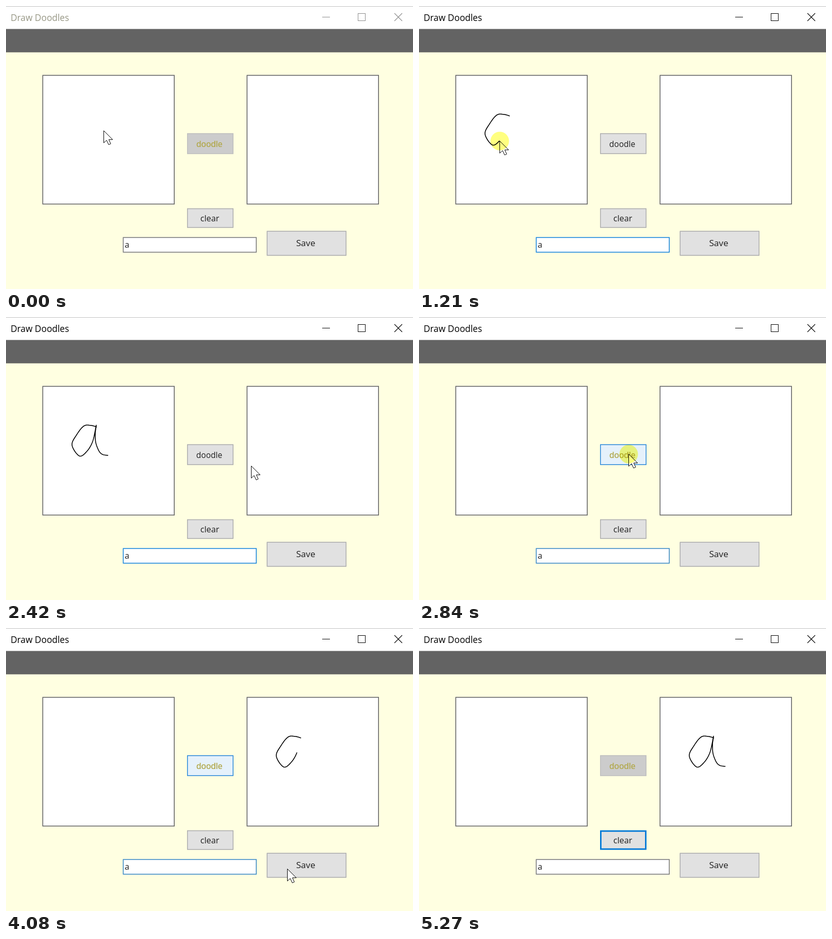
These frames come from a looping animation (789x548 px, 5.49 s). An HTML page with a canvas:

```html
<!DOCTYPE html>
<html lang="en">
<head>
<meta charset="utf-8">
<title>Draw Doodles</title>
<style>
  html, body { margin: 0; width: 100%; height: 100%; overflow: hidden; background: #ffffe1; }
  canvas { display: block; width: 789px; height: 548px; }
</style>
</head>
<body>
<canvas id="stage" width="789" height="548"></canvas>
<script>
const ctx = document.getElementById('stage').getContext('2d');
const LOOP = 5490, STEP = 203, LEAD = 18;   // the screen refreshes once per STEP
const FONT = '"Open Sans", "Noto Sans", sans-serif';
const BLUE = '#0078d7', GREY = '#adadad', FACE = '#e1e1e1', TEXT = '#202020';

// Refresh counts at which something happens.
const PRESS = 3, RELEASE = 10, CLICK = 14, DONE = 26, HIDE = 21;

// The letter: two smooth strokes, with two key points per refresh of drawing.
const BOWL = [[176, 213], [165, 210], [151, 211], [137, 228], [128, 248],
  [142, 269], [156, 261], [168, 241], [175, 209]];
const TAIL = [[175, 209], [174, 217], [173, 226], [174, 243], [180, 259], [187, 266], [198, 268]];
const CUSP = (BOWL.length - 1) / 2;
const END = CUSP + (TAIL.length - 1) / 2;
const COPY_DX = 396;

// Pointer stops: refresh count, x, y.
const STOPS = [[0, 189, 241], [2, 176, 213], [10, 198, 268], [12, 475, 288],
  [14, 406, 265], [16, 466, 532], [18, 545, 466], [HIDE, 545, 466]];

// Catmull-Rom curve through the points; u counts points.
function curve(points, u) {
  const last = points.length - 1;
  const i = Math.min(Math.floor(u), last - 1);
  const f = u - i;
  const [a, b, c, d] = [-1, 0, 1, 2].map(k => points[Math.max(0, Math.min(last, i + k))]);
  return [0, 1].map(k => b[k] + f / 2 * (c[k] - a[k]
    + f * (2 * a[k] - 5 * b[k] + 4 * c[k] - d[k] + f * (3 * (b[k] - c[k]) + d[k] - a[k]))));
}

function penAt(u) {
  return u <= CUSP ? curve(BOWL, 2 * u) : curve(TAIL, 2 * (u - CUSP));
}

// The copy is replayed at a slower, slightly rising speed.
function copyProgress(tick) {
  const n = tick - 16;
  return n < -1 ? 0 : Math.min(END, 1.5 + .41 * n + .0225 * n * n);
}

function pointerAt(tick) {
  if (tick >= PRESS && tick <= RELEASE) return penAt(tick - PRESS);
  const i = Math.max(1, STOPS.findIndex(s => s[0] >= tick));
  const [t0, x0, y0] = STOPS[i - 1], [t1, x1, y1] = STOPS[i];
  const f = (tick - t0) / (t1 - t0);
  return [x0 + (x1 - x0) * f, y0 + (y1 - y0) * f];
}

function line(points, color, width) {
  ctx.beginPath();
  points.forEach(([x, y]) => ctx.lineTo(x, y));
  ctx.strokeStyle = color;
  ctx.lineWidth = width;
  ctx.stroke();
}

function box(x, y, w, h, fill, border, width = 1.5) {
  ctx.fillStyle = fill;
  ctx.fillRect(x, y, w, h);
  ctx.strokeStyle = border;
  ctx.lineWidth = width;
  ctx.strokeRect(x + width / 2, y + width / 2, w - width, h - width);
}

function label(text, x, y, size, color, align = 'center') {
  ctx.font = size + 'px ' + FONT;
  ctx.textAlign = align;
  ctx.fillStyle = color;
  ctx.fillText(text, x, y);
}

function titleBar(active) {
  const color = active ? '#000' : '#8c8c8c';
  ctx.fillStyle = '#fff';
  ctx.fillRect(0, 0, 789, 45);
  ctx.fillStyle = '#c0c0c0';
  ctx.fillRect(0, 0, 789, 1);
  ctx.fillStyle = '#636363';
  ctx.fillRect(0, 44.5, 789, 45.2);
  label('Draw Doodles', 9, 29, 17.3, active ? '#000' : '#989886', 'left');
  line([[613, 21.5], [628, 21.5]], color, 1);
  ctx.strokeRect(682.5, 14.5, 14, 14);
  line([[753, 14], [768, 29]], color, 1.1);
  line([[768, 14], [753, 29]], color, 1.1);
}

function ink(progress, dx) {
  const points = [];
  for (let u = 0; u <= progress; u += .05) {
    const [x, y] = penAt(u);
    points.push([x + dx, y]);
  }
  line(points, '#000', 1.6);
}

function pointer([x, y], pressed) {
  ctx.save();
  ctx.translate(x + .5, y + .5);
  ctx.beginPath();
  [[0, 0], [0, 23.5], [5.5, 18.5], [9.5, 27], [13.5, 25.2], [9.8, 17.2], [17.3, 17.2]]
    .forEach(p => ctx.lineTo(...p));
  ctx.closePath();
  ctx.fillStyle = '#fff';
  ctx.fill();
  ctx.strokeStyle = '#000';
  ctx.lineWidth = 1;
  ctx.stroke();
  if (pressed) {
    ctx.globalCompositeOperation = 'multiply';
    ctx.fillStyle = '#ffff80';
    ctx.beginPath();
    ctx.arc(0, 0, 18, 0, Math.PI * 2);
    ctx.fill();
  }
  ctx.restore();
}

function doodleButton(off, busy) {
  const [fill, border] = off ? ['#cccccc', '#bfbfbf'] : busy ? ['#e5f1fb', '#2b88d8'] : [FACE, GREY];
  box(351, 246.5, 90, 40, fill, border);
  label('doodle', 394, 273, 15.5, off || busy ? '#b3aa50' : TEXT);
  if (off || busy) label('doodle', 394.5, 273, 15.5, '#b3aa50');
}

function draw(tick) {
  const active = tick >= PRESS;
  const done = tick >= DONE;
  const busy = tick >= CLICK && !done;

  ctx.fillStyle = '#ffffe1';
  ctx.fillRect(0, 0, 789, 548);
  titleBar(active);

  for (const x of [70.5, 466.5]) box(x, 133.5, 256.5, 250.8, '#fff', '#646464', 1.6);
  if (tick < CLICK) ink(Math.min(tick - PRESS, END), 0);
  else ink(copyProgress(tick), COPY_DX);

  doodleButton(!active || done, busy);
  box(351, 391.8, 90, 37.7, FACE, done ? BLUE : GREY, done ? 2.8 : 1.5);
  label('clear', 395, 417, 16.2, TEXT);
  box(505.5, 435.5, 154.5, 48, FACE, GREY);
  label('Save', 581, 465, 17.2, TEXT);

  const frame = !active || done ? '#7a7a7a' : busy ? '#3c8ac4' : '#1a86d9';
  box(226.5, 447.5, 259.5, 30, '#fff', frame, 1.6);
  label('a', 230, 468, 16.3, TEXT, 'left');
  const caret = active && tick < CLICK && Math.floor(tick / 3) % 2;
  if (caret) line([[241, 453], [241, 471]], '#000', 1.5);

  const pressed = (active && tick <= RELEASE) || tick === CLICK;
  if (tick <= HIDE) pointer(pointerAt(tick), pressed);
}

const start = performance.now();
function loop() {
  const t = (performance.now() - start) % LOOP;
  draw(Math.min(DONE, Math.floor((t + LEAD) / STEP)));
  requestAnimationFrame(loop);
}
loop();
</script>
</body>
</html>
```
